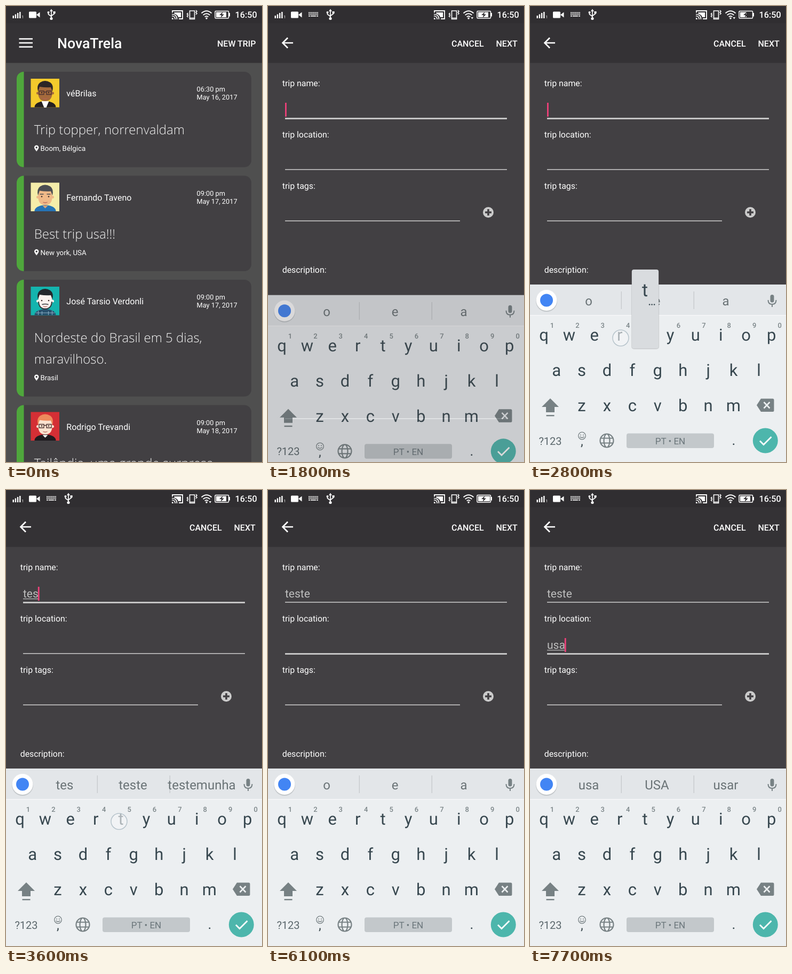
Write an HTML page that moves like this. It is 480 px wide and 853 px high and loops after 8000 ms.

```html
<!DOCTYPE html>
<html lang="en">
<head>
<meta charset="utf-8">
<title>Trip form</title>
<style>
  html, body { margin: 0; width: 100%; height: 100%; overflow: hidden; background: #424043; }
  svg { display: block; width: 480px; height: 853px; font-family: Roboto, sans-serif; text-rendering: geometricPrecision; }
  .light { font: 300 24px "Open Sans", sans-serif; }
  .mid { text-anchor: middle; }
  .medium { font-weight: 500; }
</style>
</head>
<body>
<svg id="stage" viewBox="0 0 480 853" fill="#fff"></svg>
<script>
const LOOP = 8000;
const rect = (x, y, w, h, fill, extra = '') =>
  `<rect x="${x}" y="${y}" width="${w}" height="${h}" fill="${fill}" ${extra}/>`;
const circle = (x, y, r, fill, extra = '') =>
  `<circle cx="${x}" cy="${y}" r="${r}" fill="${fill}" ${extra}/>`;
const path = (d, fill, extra = '') => `<path d="${d}" fill="${fill}" ${extra}/>`;
const line = (d, color, width, extra = '') =>
  `<path d="${d}" fill="none" stroke="${color}" stroke-width="${width}" ${extra}/>`;
const text = (x, y, size, s, extra = '') =>
  `<text x="${x}" y="${y}" font-size="${size}" ${extra}>${s}</text>`;
const group = (id, body, extra = '') => `<g id="${id}" ${extra}>${body}</g>`;

// ---- trip list ----
const specs = line('M15.5 23h9v6.5h-9zM29.5 23h9v6.5h-9zM24.5 25h5', '#4a3230', 1.3);
const avatars = [
  { bg: '#f4ca2c', skin: '#a56a3c', hair: '#2c2526', shirt: '#241f21',
    more: path('M20 42h14l-5 12h-4z', '#fff') + specs },
  { bg: '#f5eda9', skin: '#f0b988', hair: '#4c4e52', shirt: '#2673b5',
    more: path('M22 43l5 5 5-5z', '#e0a473') + line('M17 21.5h7M30 21.5h7', '#4c4e52', 1.6) },
  { bg: '#14b4ae', skin: '#f9f2ee', hair: '#23282c', shirt: '#27506c',
    more: line('M14.5 28q1 13.500 12.500 13.500t12.500-13.500', '#33363a', 2) + line('M21 33.500q6-2 12 0', '#33363a', 1.6) +
      line('M14 53v-8M21 53v-7M33 53v-7M40 53v-8M9 49h36', '#8db2c8', 1) },
  { bg: '#d42f35', skin: '#fbe2cf', hair: '#ee8a5c', shirt: '#1f1b1f',
    more: path('M22 43h10l-5 5z', '#fff') + specs }
];

function avatar({ bg, skin, hair, shirt, more }) {
  return rect(0, 0, 53.5, 53.5, bg) +
    path('M7 53.5q0-10 20-12q20 2 20 12z', shirt) +
    circle(13, 27, 2.5, skin) + circle(41, 27, 2.5, skin) +
    path('M14 16q13-7 26 0v14q-2 12-13 12t-13-12z', skin) +
    circle(20.5, 26, 1.3, '#3a2a28') + circle(33.5, 26, 1.3, '#3a2a28') +
    line('M23 36.5q4 2 8 0', '#b5625a', 1.3) +
    path('M13.5 24q-3-12 4-17q9-6 19 0q7 5 4 17l-3-8q-10 1-21-1z', hair) + more;
}

const trips = [
  [123, 'véBrilas', '06:30 pm', 'May 16, 2017', ['Trip topper, norrenvaldam'], 'Boom, Bélgica'],
  [317.5, 'Fernando Taveno', '09:00 pm', 'May 17, 2017', ['Best trip usa!!!'], 'New york, USA'],
  [512, 'José Tarsio Verdonli', '09:00 pm', 'May 17, 2017', ['Nordeste do Brasil em 5 dias,', 'maravilhoso.'], 'Brasil'],
  [746.5, 'Rodrigo Trevandi', '09:00 pm', 'May 18, 2017', ['Tailândia, uma grande surpresa'], 'Tailândia']
];

function card([top, name, hour, date, title, place], i) {
  const h = 138.5 + 40 * title.length, base = 108 + 40 * title.length;
  return `<g transform="translate(20 ${top})">` +
    rect(0, 0, 440, h, '#424043', 'rx="13"') +
    path(`M13.5 0v${h}h-.5a13 13 0 0 1-13-13V13a13 13 0 0 1 13-13z`, '#4fa73c') +
    `<g transform="translate(26.5 13)">${avatar(avatars[i])}</g>` +
    text(93.3, 46, 16, name) + text(337.5, 37, 12.8, hour) + text(337.5, 52, 12.8, date) +
    title.map((s, n) => text(32.7, 117 + 40 * n, 24, s, 'class="light" fill="#f2f2f2"')).join('') +
    path(`M37.2 ${base + 1}q-4.2-5.5-4.2-7.3a4.2 4.2 0 0 1 8.4 0q0 1.8-4.2 7.3zm0-9a1.7 1.7 0 1 0 .01 0z`, '#fff', 'fill-rule="evenodd"') +
    text(44.5, base, 13.33, place) + '</g>';
}

// ---- form ----
const label = (y, s) => text(26.7, y, 15.9, s);
const rule = (y, x2 = 448) => rect(32, y, x2 - 32, 1.3, '#e4e4e4');
const form = rect(0, 106, 480, 747, '#424043') +
  label(150, 'trip name:') + label(246, 'trip location:') + label(342, 'trip tags:') + label(499, 'description:') +
  rule(209.3) + rule(305.3) + rule(401.3, 360) + rule(771.3) +
  circle(413, 386, 10, '#cbcbcb') + line('M407 386h12M413 380v12', '#424043', 3.6) +
  text(32, 201, 21, '', 'id="name" fill="#bebebe"') + text(32, 297, 21, '', 'id="place" fill="#bebebe"') +
  rect(32, 209.3, 416, 2.7, '#c6c6c6', 'id="focus"') +
  rect(32, 203, 0, 1.2, '#bebebe', 'id="compose"') +
  rect(32, 181, 2.8, 26, '#ee4079', 'id="caret"');

// ---- keyboard ----
const rows = [['qwertyuiop', 26, 616], ['asdfghjkl', 49.7, 682], ['zxcvbnm', 97, 748]];
const PITCH = 47.4;
const keys = {};
rows.forEach(([chars, x, y]) => [...chars].forEach((c, i) => keys[c] = { x: x + PITCH * i, y }));
const grey = '#778184';

const keyboard = rect(0, 521, 480, 332, '#eceff1') + rect(0, 521, 480, 57.5, '#e3e6e9') +
  rect(0, 578, 480, 1.2, '#f8f9fa') +
  circle(31, 552, 20, '#c3c7ca') + circle(31, 550.5, 19.5, '#fff') + circle(31, 550.5, 12, '#4285f4') +
  rect(170.7, 534, 1.2, 33, '#c2c6c9') + rect(306.7, 534, 1.2, 33, '#c2c6c9') +
  [110, 238, 367].map((x, i) => text(x, 560, 24, '', `id="hint${i}" class="mid" fill="#6a7376"`)).join('') +
  rect(450.5, 540, 7, 14.5, grey, 'rx="3.5"') +
  line('M446.5 550q0 8 7.5 8t7.5-8M454 558v5', grey, 2) +
  Object.entries(keys).map(([c, k]) => text(k.x, k.y + 10.3, 31, c, 'class="mid" fill="#37474f"')).join('') +
  [...'1234567890'].map((c, i) => text(41.5 + PITCH * i, 602, 13, c, 'class="mid medium" fill="#7b8588"')).join('') +
  path('M38 734l16 16h-8v10h-16v-10h-8z', grey) + rect(30.5, 765, 15, 2.4, grey) +
  path('M433 734.5h22q2.5 0 2.5 2.5v19.5q0 2.5-2.5 2.5h-22l-8-12.2z', grey) +
  line('M438.5 741l11 11.5m0-11.5l-11 11.5', '#eceff1', 2.6) +
  text(38, 820.5, 20, '?123', 'class="mid" fill="#5c686d"') +
  circle(97.5, 804, 6.8, 'none', `stroke="${grey}" stroke-width="1.3"`) +
  circle(95, 802.5, 1, grey) + circle(100, 802.5, 1, grey) + line('M93.5 805.5q4 4 8 0', grey, 1.3) +
  text(97.5, 822, 22, ',', 'class="mid medium" fill="#455257"') +
  line('M131.5 813a12.5 12.5 0 1 0 25 0a12.5 12.5 0 1 0-25 0M138.5 813a5.5 12.5 0 1 0 11 0a5.5 12.5 0 1 0-11 0M133 808.5h22M133 817.5h22', grey, 2.2) +
  rect(181, 799.5, 164, 27.5, '#c3c8cb', 'rx="4"') +
  text(263, 820, 17, 'PT • EN', 'class="mid" fill="#6b767b"') +
  text(382, 821, 26, '.', 'class="mid" fill="#37474f"') +
  circle(441.3, 813, 23.5, '#4db6ac') + line('M431 813.5l7 7l14.5-14.5', '#fff', 2.8);

const popup = rect(-25.5, -122.5, 52, 148.5, '#000', 'rx="5" opacity=".14"') + rect(-24.8, -123, 50.4, 147.5, '#d9dcdf', 'rx="4"') +
  text(0, -73, 34, '', 'id="popChar" class="mid" fill="#37474f"') +
  [8.5, 13, 17.5].map(x => circle(x, -57.5, 1.3, '#37474f')).join('');

// ---- status bar ----
const status = rect(0, 0, 480, 32, '#302e31') +
  [5, 7.5, 10, 12].map((h, i) => rect(12.5 + 4.2 * i, 23 - h, 2.4, h, '#fff')).join('') +
  text(29.5, 23, 7, '1') +
  rect(43, 10.5, 14, 12, '#fff', 'rx="1.5"') + path('M57 16.5l6.5-5v10z', '#fff') +
  group('keyIcon', line('M76 12.5h18M76 15.5h18', '#e4e4e4', 2, 'stroke-dasharray="2 .7"') +
    line('M76 18.8h3M80 18.8h10M91 18.8h3', '#e4e4e4', 2)) +
  group('usb', line('M0 8v14M-5.5 12.5v3l5.5 4M5.5 12v2.5l-5.5 4', '#fff', 1.7) +
    path('M0 5.5l3 4.5h-6z', '#fff') + circle(0, 23.5, 2.6, '#fff') + circle(-5.5, 12, 2, '#fff') + rect(3.6, 10, 4, 4, '#fff')) +
  line('M312 12.5v-3.5h19v15h-7', '#fff', 1.8) + path('M315.5 12h12.5v9h-5q-1-5-7.5-6.5z', '#fff') +
  path('M311 22q3 0 3 3h-3z', '#fff') + line('M311 18.8q6 0 6.2 6.2M311 15.5q9.5 0 9.5 9.5', '#fff', 1.6) +
  line('M344.5 9h9v15.5h-9zM344.5 22.5h9M341.5 13l-2 2 2 2-2 2 2 2M356 8l2 2-2 2 2 2-2 2', '#fff', 1.6) +
  line('M366.5 13.5q9.5-8.5 19 0M369.7 17q6.3-5.5 12.6 0M372.7 20.3q3.3-2.8 6.6 0', '#fff', 1.9) +
  circle(376, 23, 1.7, '#fff') + path('M380.5 21h4.5l-2.2 3.5z', '#fff', 'id="arrow"') +
  rect(392, 9.5, 25.5, 13.5, 'none', 'rx="1.5" stroke="#fff" stroke-width="1.5"') + rect(418, 13, 2, 6.5, '#fff') +
  rect(394, 11.5, 16, 9.5, '#fff', 'id="charge"') +
  path('M406.5 11l-6.5 6h4l-1.5 5 6.5-6.5h-4z', '#302e31') +
  text(429.5, 22.3, 16.2, '16:50', 'class="medium"');

document.getElementById('stage').innerHTML =
  group('list', rect(0, 106, 480, 747, '#4f4f4f') + trips.map(card).join('')) +
  group('form', form) +
  rect(0, 32, 480, 74.5, '#343235') +
  group('listBar', line('M24.5 61.5h25.5M24.5 69h25.5M24.5 76.5h25.5', '#fff', 2.7) +
    text(96, 79, 26.67, 'NovaTrela', 'class="medium"') + text(396, 75.7, 16, 'NEW TRIP', 'class="medium"')) +
  group('formBar', line('M47 69h-19M37 59.5l-9.5 9.5 9.5 9.5', '#fff', 2.7) +
    text(344, 75.7, 16, 'CANCEL', 'class="medium"') + text(427.5, 75.7, 16, 'NEXT', 'class="medium"')) +
  status + group('kb', keyboard) + group('pop', popup) +
  circle(0, 0, 15, '#f4f6f7', 'id="touch" fill-opacity=".62" stroke="#9fb0ba" stroke-opacity=".7" stroke-width="1.5"');

const el = {};
document.querySelectorAll('[id]').forEach(e => el[e.id] = e);
const set = (id, attrs) => { for (const k in attrs) el[id].setAttribute(k, attrs[k]); };
const show = (id, on) => set(id, { opacity: on ? 1 : 0 });

// ---- timeline ----
const FOCUS = 1595, MOVE = 4295;
// key, time of touch, touch point
const presses = [
  ['t', 2690, 170, 621], ['e', 3000, 120, 619], ['s', 3250, 100, 683], ['t', 3550, 212, 620], ['e', 3850, 120, 619],
  ['u', 6650, 312, 622], ['s', 7070, 108, 691.5], ['a', 7390, 36, 697]
];
const TYPED = 200;
// time, touch point, hold
const taps = [[130, 436, 72, 200], [1400, 200, 192, 150], [4120, 34, 288, 120],
  ...presses.map(([, at, x, y]) => [at, x, y, 160])];
const hints = {
  '': 'o e a', t: 't te tem', te: 'te tem tenho', tes: 'tes teste testemunha', test: 'test teste testes',
  teste: 'teste testes testemunha', u: 'u U um', us: 'us US usar', usa: 'usa USA usar'
};
const clamp = v => Math.max(0, Math.min(1, v));
// piecewise linear value through [time, value] points
function track(t, points) {
  for (let i = 1; i < points.length; i++) {
    const [a, from] = points[i - 1], [b, to] = points[i];
    if (t < b) return from + (to - from) * clamp((t - a) / (b - a));
  }
  return points[points.length - 1][1];
}

function drawFields(t) {
  const second = t >= MOVE;
  const typed = presses.filter(p => t >= p[1] + TYPED);
  const word = (from, to) => typed.filter(p => p[1] >= from && p[1] < to).map(p => p[0]).join('');
  const words = { name: word(FOCUS, MOVE), place: word(MOVE, LOOP) };
  for (const id in words) el[id].textContent = words[id];

  const id = second ? 'place' : 'name', active = words[id], dy = second ? 96 : 0;
  const width = active ? el[id].getComputedTextLength() : 0;
  const lastKey = typed.length ? typed[typed.length - 1][1] + TYPED : 0;
  const since = t - Math.max(lastKey, second ? MOVE : FOCUS);
  set('focus', { y: 209.3 + dy });
  set('compose', { y: 203 + dy, width });
  set('caret', { x: 32 + Math.max(0, width - 1), y: 181 + dy });
  show('focus', t >= FOCUS);
  show('caret', t >= FOCUS && Math.floor(since / 500) % 2 === 0);
  hints[active].split(' ').forEach((s, i) => el['hint' + i].textContent = s);
}

function drawKeyboard(t) {
  const drop = track(t, [[1690, 50], [1800, 20], [1900, 5], [2000, 0]]);
  set('kb', { transform: `translate(0 ${drop})`, opacity: track(t, [[1690, 0], [1800, 0.8], [1900, 1]]) });

  const press = presses.find(p => t >= p[1] + 80 && t < p[1] + 250);
  show('pop', press);
  if (press) {
    const k = keys[press[0]];
    set('pop', { transform: `translate(${k.x} ${k.y})` });
    el.popChar.textContent = press[0];
  }
  const tap = taps.find(([at, , , hold]) => t >= at && t < at + hold);
  show('touch', tap);
  if (tap) set('touch', { cx: tap[1], cy: tap[2] });
}

function draw(t) {
  const fade = clamp((t - 380) / 300);
  set('form', { opacity: fade });
  set('formBar', { opacity: fade });
  set('listBar', { opacity: 1 - fade });
  drawFields(t);
  drawKeyboard(t);

  const icon = t >= 1700;
  show('keyIcon', icon);
  set('usb', { transform: `translate(${icon ? 117 : 85} 0)` });
  const level = Math.floor((t + LOOP - 50) / 500) % 4;
  set('charge', { width: [22, 12, 16, 19][level] });
  show('arrow', t >= 1090 && t < 5990 || t >= 6590 && t < 7490);
}

const start = performance.now();
function tick() {
  draw((performance.now() - start) % LOOP);
  requestAnimationFrame(tick);
}
tick();
</script>
</body>
</html>
```
